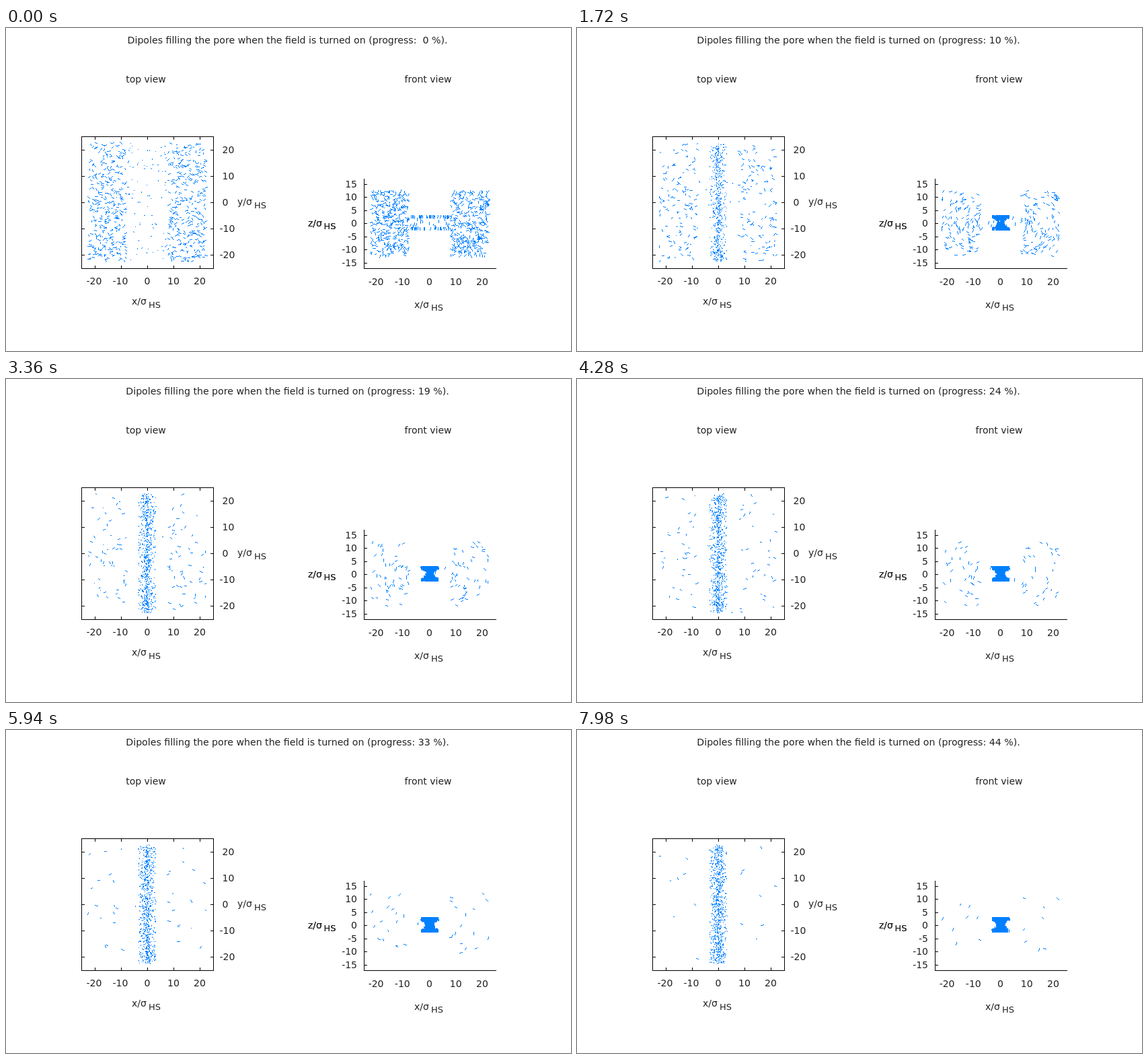
Animation of 840x480 px, one loop 8 s. Source, as an HTML page:

```html
<!DOCTYPE html>
<html lang="en">
<head>
<meta charset="utf-8">
<title>Dipoles filling the pore</title>
<style>
  html, body { margin: 0; width: 100%; height: 100%; overflow: hidden; background: #fff; }
  svg { display: block; width: 840px; height: 480px; }
  text { font: 14px "DejaVu Sans", sans-serif; fill: #222; white-space: pre; }
  #title { font-size: 14.15px; }
  .sub { font-size: 13px; }
  path { shape-rendering: crispEdges; }
  #axes { fill: none; stroke: #000; }
  #dots { fill: #0080ff; }
</style>
</head>
<body>
<svg viewBox="0 0 840 480" xmlns="http://www.w3.org/2000/svg">
  <path id="dots"/>
  <path id="axes"/>
  <g id="labels"></g>
  <text id="title" x="418.5" y="23" text-anchor="middle"></text>
</svg>
<script>
const LOOP = 8000, STEP = 20;
const BULK = 660, PORE = 80;
const SCALE = 3.92;
const TOP = { x: 210, y: 259 }, FRONT = { x: 630, y: 290.5 };
const TAU = Math.PI * 2;
const $ = id => document.getElementById(id);

// ---- axes and labels ----
const labels = $('labels');
function label(str, x, y, anchor = 'start', cls = '') {
  const t = document.createElementNS('http://www.w3.org/2000/svg', 'text');
  t.setAttribute('x', x);
  t.setAttribute('y', y);
  t.setAttribute('text-anchor', anchor);
  if (cls) t.setAttribute('class', cls);
  t.textContent = str;
  labels.append(t);
}
function axisName(letter, x, y, subX, subY) {
  label(letter + '/σ', x, y);
  label('HS', subX, subY, 'start', 'sub');
}

let axes = 'M112.5 161.5H308.5V357.5H112.5ZM532.5 224V357.5H729';
for (let v = -20; v <= 20; v += 10) {
  const px = Math.round(TOP.x + v * SCALE) + 0.5;
  const py = Math.round(TOP.y - v * SCALE) + 0.5;
  axes += `M${px} 162v4M${px} 357v-4M113 ${py}h4M308 ${py}h-4`;
  label(v, px - 0.5 - (v < 0 ? 1 : 0), 381, 'middle');
  label(v, FRONT.x + v * SCALE - (v < 0 ? 1.5 : 0.5), 382, 'middle');
  label(v, v < 0 ? 317.5 : 321.5, py + 4.5, 'start');
}
for (let v = -15; v <= 15; v += 5) {
  const py = Math.floor(FRONT.y - v * 3.9) + 0.5;
  axes += `M533 ${py}h4`;
  label(v, 522, py + 4.5, 'end');
}
$('axes').setAttribute('d', axes);

label('top view', 208, 81, 'middle');
label('front view', 627.5, 81, 'middle');
axisName('x', 187, 411, 212, 416);
axisName('x', 607, 416, 632, 420);
axisName('y', 344, 263, 369, 268);
// The z name is printed twice, which makes it darker
axisName('z', 449, 295, 472.5, 299);
axisName('z', 449, 295, 472.5, 299);

// ---- particles ----
function rnd(a, b) {
  let h = Math.imul(a + 1, 0x9E3779B1) ^ Math.imul(b + 1, 0x85EBCA6B);
  h = Math.imul(h ^ h >>> 15, 0x2C1B3C6D);
  h = Math.imul(h ^ h >>> 12, 0x297A2D39);
  return ((h ^ h >>> 15) >>> 0) / 2 ** 32;
}
const mix = (a, b, u) => a + (b - a) * u;
const clamp = u => Math.max(0, Math.min(1, u));

// Reflect a value back into a range
function fold(v, lo, hi) {
  if (v < lo) v = 2 * lo - v;
  if (v > hi) v = 2 * hi - v;
  return v;
}

// Share of the reservoir still outside the pore
const outside = t => 0.8 * Math.exp(-t / 1500) + 0.2 * Math.exp(-t / 3500);
function entryTime(share) {
  let lo = 0, hi = 60000;
  for (let k = 0; k < 40; k++) {
    const mid = (lo + hi) / 2;
    if (outside(mid) > share) lo = mid; else hi = mid;
  }
  return lo;
}

const parts = Array.from({ length: BULK + PORE }, (_, i) => {
  const r = k => rnd(i, k);
  return {
    i,
    free: i < BULK,
    entry: i < BULK ? entryTime((i + 0.5) / BULK) : 0,
    side: i % 2 ? 1 : -1,
    x: mix(7.9, 22.4, r(1)),
    y: mix(-22.4, 22.4, r(2)),
    z: mix(-12.4, 12.2, r(3)),
    startX: mix(-7.4, 7.4, r(4)),
    wall: r(5) < (i < BULK ? 0.5 : 0.8),
    layer: r(6) * 2 - 1,
    phase: [r(7), r(8), r(9)].map(v => v * TAU),
    rate: [r(10), r(11), r(12)].map(v => TAU / mix(1300, 3200, v)),
    tilt: r(13) - 0.5,
    yaw: r(14) - 0.5
  };
});

function inPore(p, wave, t) {
  const z = p.wall ? Math.sign(p.layer) * (2.1 + 0.3 * Math.abs(p.layer)) : p.layer * 2.1;
  const waist = mix(0.9, 1.4, clamp(t / 5000));
  const half = Math.min(3.1, waist + 1.9 * (z / 2.2) ** 2);
  const x = half * (wave(0) + wave(1)) / 1.8;
  return { x: Math.max(-3.2, Math.min(3.2, x)), y: fold(p.y + 0.6 * wave(2), -22.5, 22.5), z: z + 0.25 };
}

function inBulk(p, wave, jitter) {
  return {
    x: p.side * fold(p.x + 2.4 * wave(0) + jitter(1), 7.9, 22.4),
    y: fold(p.y + 2 * wave(1) + jitter(2), -22.5, 22.5),
    z: fold(p.z + 2.4 * wave(2) + jitter(3), -12.5, 12.3)
  };
}

function place(p, t, step) {
  const wave = k => Math.sin(p.phase[k] + p.rate[k] * t);
  const jitter = k => (rnd(p.i + 1000 * k, step + 50) - 0.5) * 0.4;
  const pore = inPore(p, wave, t);
  if (!p.free) {
    pore.x = mix(pore.x, p.startX, Math.exp(-t / 150));
  }
  pore.x += jitter(4) * 0.6;
  pore.y += jitter(5);

  let pos = pore;
  const left = p.entry - t;
  if (p.free && left > 0) {
    pos = inBulk(p, wave, jitter);
    const pull = p.entry > 200 ? clamp(1 - left / 200) ** 2 : 0;
    pos.x = mix(pos.x, p.side * 7.4, pull);
    pos.z = mix(pos.z, pore.z, pull);
    pos.y = mix(pos.y, pore.y, pull);
  } else if (p.free) {
    pos.x = mix(p.side * 7.4, pore.x, Math.sqrt(clamp(-left / 100)));
  }

  // Outside the pore the dipoles line up with the stray field of the slit
  const { x, z } = pos;
  const far = Math.abs(x) > 7;
  const disorder = far ? 1.4 + 3 * Math.exp(-t / 350) : 0.35;
  let angle = far ? Math.atan2(z * z - x * x, 2 * x * z) : Math.PI / 2;
  angle += (p.tilt + jitter(6)) * disorder;
  const yaw = (p.yaw + jitter(7)) * (far ? 1.6 : 0.5);
  pos.dx = Math.cos(angle) * Math.cos(yaw) / 2;
  pos.dz = Math.sin(angle) * Math.cos(yaw) / 2;
  pos.dy = Math.sin(yaw) / 2;
  return pos;
}

// Unsmoothed line with both end pixels, one box per horizontal run
function dash(x, y, dx, dy) {
  const x0 = Math.floor(x - dx), y0 = Math.floor(y - dy);
  const w = Math.floor(x + dx) - x0, h = Math.floor(y + dy) - y0;
  const n = Math.max(Math.abs(w), Math.abs(h));
  let d = '', runY = null, from = 0, to = 0;
  const flush = () => {
    if (runY !== null) d += `M${from} ${runY}H${to + 1}v1H${from}z`;
  };
  for (let k = 0; k <= n; k++) {
    const u = n ? k / n : 0;
    const px = Math.round(x0 + w * u), py = Math.round(y0 + h * u);
    if (py === runY) {
      from = Math.min(from, px);
      to = Math.max(to, px);
    } else {
      flush();
      runY = py;
      from = to = px;
    }
  }
  flush();
  return d;
}

function render(time) {
  const step = Math.floor(time % LOOP / STEP);
  const t = step * STEP;
  let d = '';
  for (const p of parts) {
    const q = place(p, t, step);
    d += dash(TOP.x + q.x * SCALE, TOP.y - q.y * SCALE, q.dx * SCALE, -q.dy * SCALE);
    d += dash(FRONT.x + q.x * SCALE, FRONT.y - q.z * SCALE, q.dx * SCALE, -q.dz * SCALE);
  }
  $('dots').setAttribute('d', d);
  const percent = String(Math.round(step / 9)).padStart(2);
  $('title').textContent = `Dipoles filling the pore when the field is turned on (progress: ${percent} %).`;
}

const start = performance.now();
function tick() {
  render(performance.now() - start);
  requestAnimationFrame(tick);
}
tick();
</script>
</body>
</html>
```
